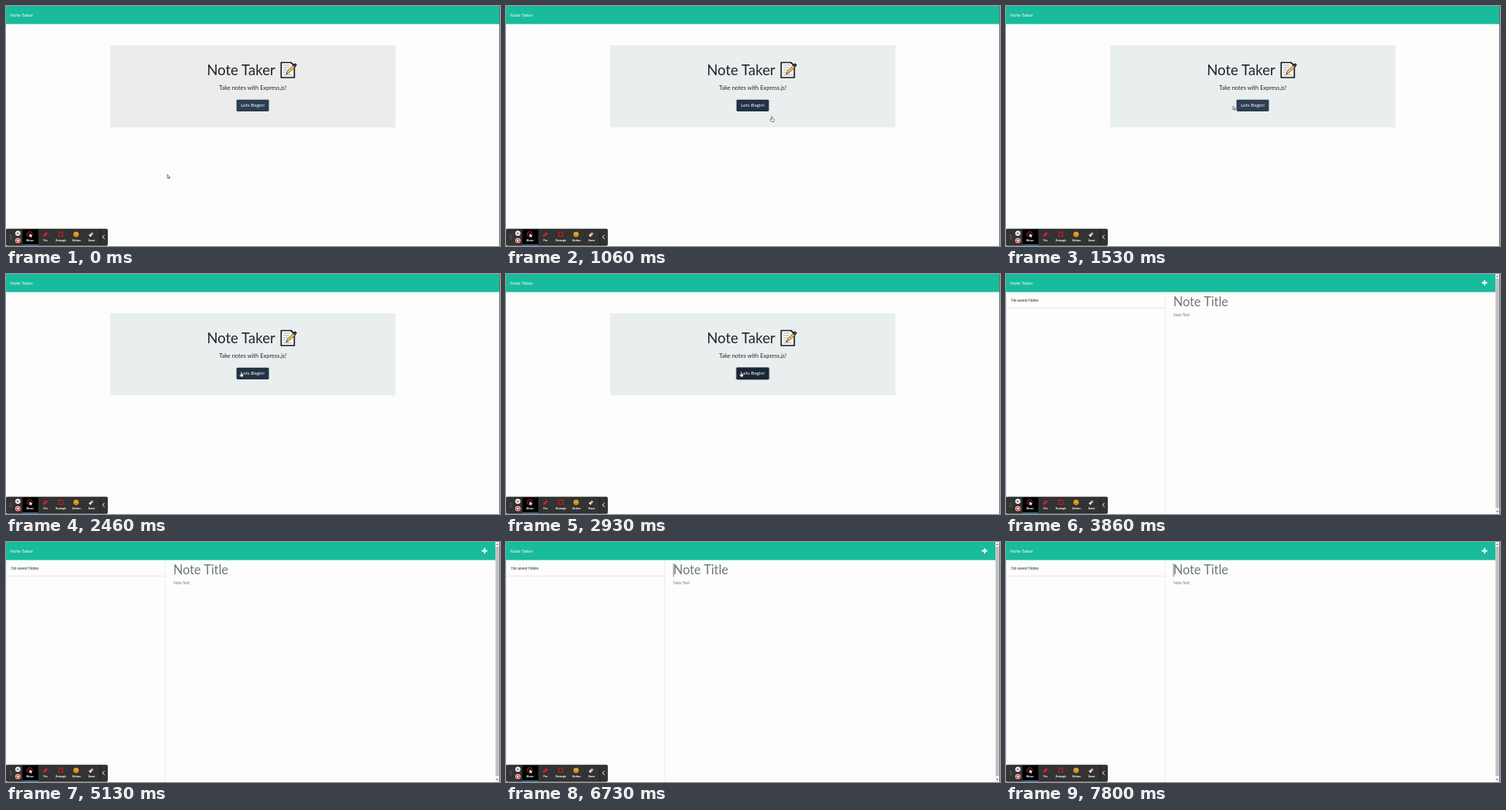
Recreate the animation shown at these times as an HTML page. Size 640 by 312 pixels, loop 8 s.

```html
<!DOCTYPE html>
<html lang="en">
<head>
<meta charset="utf-8">
<title>Note Taker</title>
<style>
  html, body { margin: 0; width: 100%; height: 100%; overflow: hidden; background: #fdfdfd; }
  svg { display: block; width: 100%; height: 100%; }
  text { font-family: Lato, sans-serif; }
  .middle { text-anchor: middle; }
  .label { font: bold 3px Roboto, sans-serif; fill: #fff; text-anchor: middle; }
</style>
</head>
<body>
<svg viewBox="0 0 640 312">
  <rect width="640" height="312" fill="#fdfdfd"/>
  <rect width="639" height="23.5" fill="#18bc9c"/>
  <text x="5.3" y="14" font-size="6.2" fill="#fff">Note Taker</text>

  <g id="home">
    <rect id="panel" x="135" y="51" width="369.5" height="106.7" rx="1"/>
    <text x="260.2" y="89.8" font-size="18.6" fill="#212529">Note Taker</text>
    <g id="memo" stroke-linejoin="round" stroke-linecap="round">
      <path d="M356.5 73.5h12.5l4.5 4v15.5h-17z" fill="#fff" stroke="#151515" stroke-width="1.7"/>
      <path d="M359.5 77h8M359.5 80h7M359.5 83h5M359.5 86h3M359.5 89.7h10.5" fill="none" stroke="#8b8b8b" stroke-width=".8"/>
      <path d="M363 88.5l2-4.5 8-7.5 2.2 2.2-8 7.7z" fill="#f6c04d" stroke="#2a2a2a" stroke-width=".7"/>
      <path d="M372 76.8l2.6-2 2 1.8-2 2.6z" fill="#30383c" stroke="#151515" stroke-width=".8"/>
      <path d="M363 88.5l.8-1.8.9.9z" fill="#151515"/>
    </g>
    <text class="middle" x="319.6" y="109" font-size="7.5" fill="#212529">Take notes with Express.js!</text>
    <rect id="ring" x="297.8" y="121.1" width="43.6" height="16.6" rx="2" fill="#8592a0"/>
    <rect id="button" x="298.6" y="121.8" width="42" height="15.2" rx="1.4"/>
    <text class="middle" x="319.6" y="131.4" font-size="6.4" fill="#fff">Lets Begin!</text>
  </g>

  <g id="notes">
    <path d="M206 23.5V312M.4 23.5V312" stroke="#e3e5e6" stroke-width=".8"/>
    <g id="list">
      <path d="M0 44.2H206" stroke="#dfe1e2" stroke-width=".8"/>
      <text x="7" y="36" font-size="5.05" fill="#212529">No saved Notes</text>
    </g>
    <text x="216.8" y="42.2" font-size="16.3" fill="#727679">Note Title</text>
    <text x="216.9" y="55.2" font-size="4.95" fill="#727679">Note Text</text>
    <path id="caret" d="M217.1 28V45.3" stroke="#444" stroke-width=".7"/>
    <path d="M616.5 11.5h7M620 8v7" stroke="#fff" stroke-width="1.9"/>
    <rect x="634" width="5" height="312" fill="#f1f1f1"/>
    <rect x="634.4" y="6" width="4.3" height="298" fill="#bfbfbf"/>
    <path d="M635.2 3.8h2.8l-1.4-1.7zM635.2 308h2.8l-1.4 1.7z" fill="#505050"/>
  </g>
  <path d="M639.5 0V312" stroke="#4a4a4a" stroke-width=".8"/>

  <g id="toolbar">
    <rect x=".4" y="290" width="131" height="21.2" rx="1.2" fill="#333" stroke="#1c1c1c" stroke-width=".8"/>
    <path d="M5.2 297.8v6M7.2 297.8v6" stroke="#999" stroke-width=".8" stroke-dasharray=".9 1.2"/>
    <circle cx="15.4" cy="295.6" r="3.3" fill="#fff"/>
    <path d="M14.5 294.1v3M16.3 294.1v3" stroke="#333" stroke-width=".8"/>
    <circle cx="15.4" cy="305" r="3.3" fill="#fff"/>
    <circle cx="15.4" cy="305" r="2.6" fill="#e0322f"/>
    <rect x="14.3" y="303.9" width="2.2" height="2.2" fill="#fff"/>
    <rect x="21.3" y="290.4" width="20.5" height="20.4" fill="#000"/>
    <path d="M21.3 310.3h20.5" stroke="#3a8fd0" stroke-width=".9"/>
    <circle cx="30.8" cy="296.6" r="3.2" fill="none" stroke="#d9302c" stroke-width=".9"/>
    <path d="M30.5 295.4v5l1.3-1 .8 1.6 1-.5-.8-1.5h1.6z" fill="#fff"/>
    <path d="M49.2 298.9l4-4" stroke="#e3202b" stroke-width="2.6"/>
    <path d="M47.6 300.3l.8-2.2 1.4 1.4z" fill="#e3202b"/>
    <rect x="68.2" y="294" width="5.4" height="5.4" fill="none" stroke="#d51920" stroke-width="1.1"/>
    <circle cx="90.8" cy="296.8" r="3.4" fill="#f5ad24"/>
    <path d="M89.4 295.3v1M92.2 295.3v1M88.8 297.6q2 2.4 4 0" fill="none" stroke="#69380c" stroke-width=".7"/>
    <path d="M108.9 298.5l3.4-3.4" stroke="#e6a3a6" stroke-width="3"/>
    <path d="M108.3 299.1l1.2-1.2" stroke="#fff" stroke-width="3"/>
    <text class="label" x="31.2" y="305.5">Mouse</text>
    <text class="label" x="51.2" y="305.5">Pen</text>
    <text class="label" x="71.2" y="305.5">Rectangle</text>
    <text class="label" x="91.2" y="305.5">Stickers</text>
    <text class="label" x="111" y="305.5">Eraser</text>
    <path d="M121.6 290.4v20.4" stroke="#1c1c1c" stroke-width=".7"/>
    <path d="M127.6 297.6l-2.4 2.6 2.4 2.6" fill="none" stroke="#fff" stroke-width="1"/>
  </g>

  <g id="pointer" stroke="#333" stroke-width=".6" stroke-linejoin="round" fill="#fff">
    <path id="arrow" d="M0 0v4.8l1.1-1 .8 1.7.9-.4-.8-1.6h1.5z"/>
    <path id="hand" d="M-.5.5q.5-.9 1 0v2.2l2 .5q.6.2.5.9l-.5 2.9h-2.9l-1.8-2.5q-.2-.9.7-.6l1 .7z"/>
  </g>
</svg>
<script>
const LOOP = 8000, PAGE_OPENS = 3060, LIST_LOADS = 3130, PRESS = 2800;
const BLINK_START = 4590, BLINK = 533.4;
// time, x, y of the pointer tip
const path = [
  [0, 209, 219], [60, 209, 219], [480, 304, 136], [800, 338, 133], [1060, 344.5, 143.5],
  [1300, 320, 139], [1530, 294, 130], [1800, 303, 127], [1930, 304.5, 126.8]
];
const el = id => document.getElementById(id);
const show = (id, on) => el(id).style.display = on ? '' : 'none';
const within = (t, from, to) => t >= from && t < to;

function pointerAt(t) {
  const next = path.findIndex(p => p[0] > t);
  if (next < 0) return path.at(-1).slice(1);
  const [t0, x0, y0] = path[next - 1], [t1, x1, y1] = path[next];
  const k = (t - t0) / (t1 - t0), e = k * k * (3 - 2 * k);
  return [x0 + (x1 - x0) * e, y0 + (y1 - y0) * e];
}

function draw(t) {
  const onHome = t < PAGE_OPENS;
  const hand = within(t, 480, 1130) || t >= 1800;
  const hover = within(t, 480, 1300) || t >= 1800;
  show('home', onHome);
  show('notes', !onHome);
  show('list', t >= LIST_LOADS);
  show('ring', t >= PRESS);
  show('caret', t >= BLINK_START && Math.floor((t - BLINK_START) / BLINK) % 2 === 0);
  show('pointer', t < LIST_LOADS);
  show('hand', hand);
  show('arrow', !hand);
  el('panel').setAttribute('fill', t < 60 ? '#ececec' : '#e9eeee');
  el('button').setAttribute('fill', t >= PRESS ? '#1a2733' : hover ? '#223245' : '#2c3e50');
  el('pointer').setAttribute('transform', `translate(${pointerAt(t)})`);
}

const start = performance.now();
function tick() {
  draw((performance.now() - start) % LOOP);
  requestAnimationFrame(tick);
}
tick();
</script>
</body>
</html>
```
